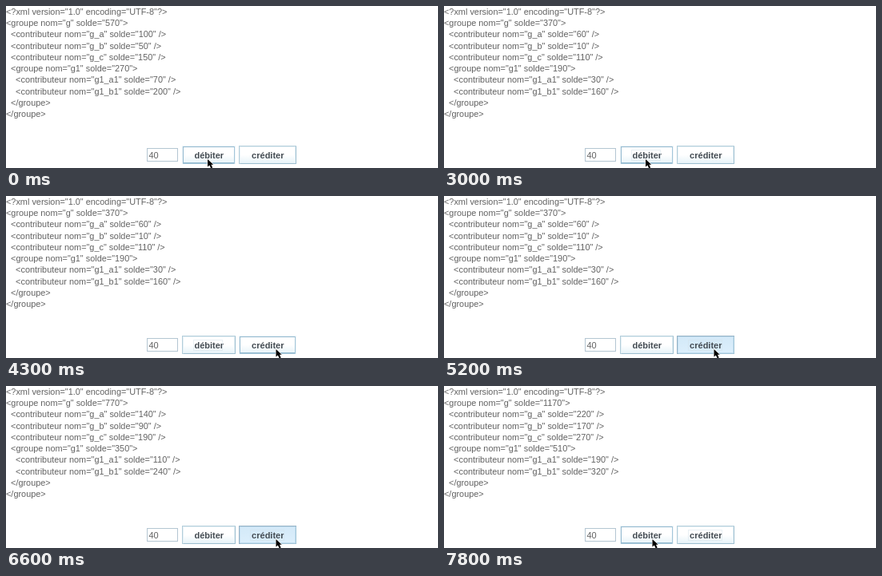
Recreate the animation shown at these times as an HTML page. Size 540 by 203 pixels, loop 8000 ms.

```html
<!DOCTYPE html>
<html lang="fr">
<head>
<meta charset="utf-8">
<title>Débiter / créditer</title>
<style>
html, body { margin: 0; width: 100%; height: 100%; overflow: hidden; background: #fff; }
svg { display: block; width: 540px; height: 203px; }
text { font-family: "Liberation Sans", Arial, sans-serif; fill: #626262; white-space: pre; }
#xml text { font-size: 10.9px; }
.label { font-size: 11px; font-weight: bold; fill: #434b52; text-anchor: middle; }
.edge { fill: url(#idle); stroke: #b2cdda; }
.inner { fill: none; stroke: #e6f1f6; }
.shade { fill: none; stroke: #9dbfd0; }
.focus { fill: none; stroke: #d3e0e8; stroke-dasharray: 1 1; visibility: hidden; }
.hover .edge { stroke: #eef5f9; }
.hover .inner { stroke: #93b9cf; }
.hover .shade { stroke: #a3c6d9; transform: translateX(-1px); }
.down .edge { fill: url(#pressed); stroke: #93b1c5; }
.down .inner { stroke: #c0dcee; }
.down .shade { transform: none; }
.focused .focus { visibility: visible; }
</style>
</head>
<body>
<svg viewBox="0 0 540 203">
  <defs>
    <linearGradient id="idle" x2="0" y2="1">
      <stop offset=".5" stop-color="#fff"/><stop offset="1" stop-color="#e6f3f9"/>
    </linearGradient>
    <linearGradient id="pressed" x2="0" y2="1">
      <stop stop-color="#d3e9f8"/><stop offset="1" stop-color="#dceffc"/>
    </linearGradient>
  </defs>
  <g id="xml"></g>
  <rect x="176.5" y="178.5" width="38" height="16" fill="#fff" stroke="#b4c6d2"/>
  <text x="178.5" y="191" font-size="11">40</text>
  <g id="buttons"></g>
  <path id="cursor" d="M0 0V9.6L2.3 7.6L4.2 11.4L6.2 10.5L4.4 6.8H7.2Z"
    fill="#000" stroke="#fff" stroke-width="1.2" paint-order="stroke"/>
</svg>
<script>
const LOOP = 8000, STEP = 100, AMOUNT = 40;
const NS = "http://www.w3.org/2000/svg";
const $ = id => document.getElementById(id);

function add(parent, tag, attrs, content = "") {
  const el = document.createElementNS(NS, tag);
  for (const key in attrs) el.setAttribute(key, attrs[key]);
  el.textContent = content;
  return parent.appendChild(el);
}

function makeButton(x, width, label) {
  const g = add($("buttons"), "g", {}), mid = x + width / 2, half = label.length * 2.6;
  const box = (cls, inset) => add(g, "rect", {
    class: cls, x: x + inset, y: 175 + inset, width: width - 2 * inset, height: 23 - 2 * inset });
  box("edge", .5);
  box("inner", 1.5);
  add(g, "path", { class: "shade", d: `M${x + 2} 197.5H${x + width - .5}V176` });
  add(g, "text", { class: "label", x: mid + .3, y: 191 }, label);
  add(g, "rect", { class: "focus", x: Math.round(mid - half) - .5, y: 180.5,
    width: Math.round(half * 2), height: 13 });
  return { g, x, width };
}

const buttons = [makeButton(220, 67, "débiter"), makeButton(291, 72, "créditer")];

// Each click: button index, press time, release time
const clicks = [
  [0, 1500, 1800], [1, 5000, 5400], [1, 5700, 5800], [1, 6600, 6700], [1, 7100, 7300]
];
const lines = Array.from({ length: 10 }, (_, i) =>
  add($("xml"), "text", { x: 0, y: 10.7 + i * 14.28 }));

function xml(change) {
  const group = (pad, name, start, leaves) =>
    `${pad}<groupe nom="${name}" solde="${start + change * leaves}">`;
  const leaf = (pad, name, start) =>
    `${pad}<contributeur nom="${name}" solde="${start + change}" />`;
  return [
    '<?xml version="1.0" encoding="UTF-8"?>',
    group("", "g", 570, 5),
    leaf("  ", "g_a", 100),
    leaf("  ", "g_b", 50),
    leaf("  ", "g_c", 150),
    group("  ", "g1", 270, 2),
    leaf("    ", "g1_a1", 70),
    leaf("    ", "g1_b1", 200),
    "  </groupe>",
    "</groupe>"
  ];
}

function ease(t, from, to) {
  const p = Math.min(1, Math.max(0, (t - from) / (to - from)));
  return p * p * (3 - 2 * p);
}

function draw(t) {
  const x = 252 + 85.5 * ease(t, 4000, 4300) - 77 * ease(t, 7500, 7800);
  let change = 0, focus = -1, down = -1;
  for (const [button, press, release] of clicks) {
    if (t >= press) focus = button;
    if (t >= press && t < release) down = button;
    if (t >= release) change += button ? AMOUNT : -AMOUNT;
  }
  xml(change).forEach((line, i) => lines[i].textContent = line);
  buttons.forEach((b, i) => {
    b.g.classList.toggle("hover", x >= b.x && x < b.x + b.width);
    b.g.classList.toggle("down", i === down);
    b.g.classList.toggle("focused", i === focus);
  });
  $("cursor").setAttribute("transform", `translate(${x} 192)`);
}

function frame() {
  draw(Math.floor(performance.now() % LOOP / STEP) * STEP);
  requestAnimationFrame(frame);
}
frame();
</script>
</body>
</html>
```
